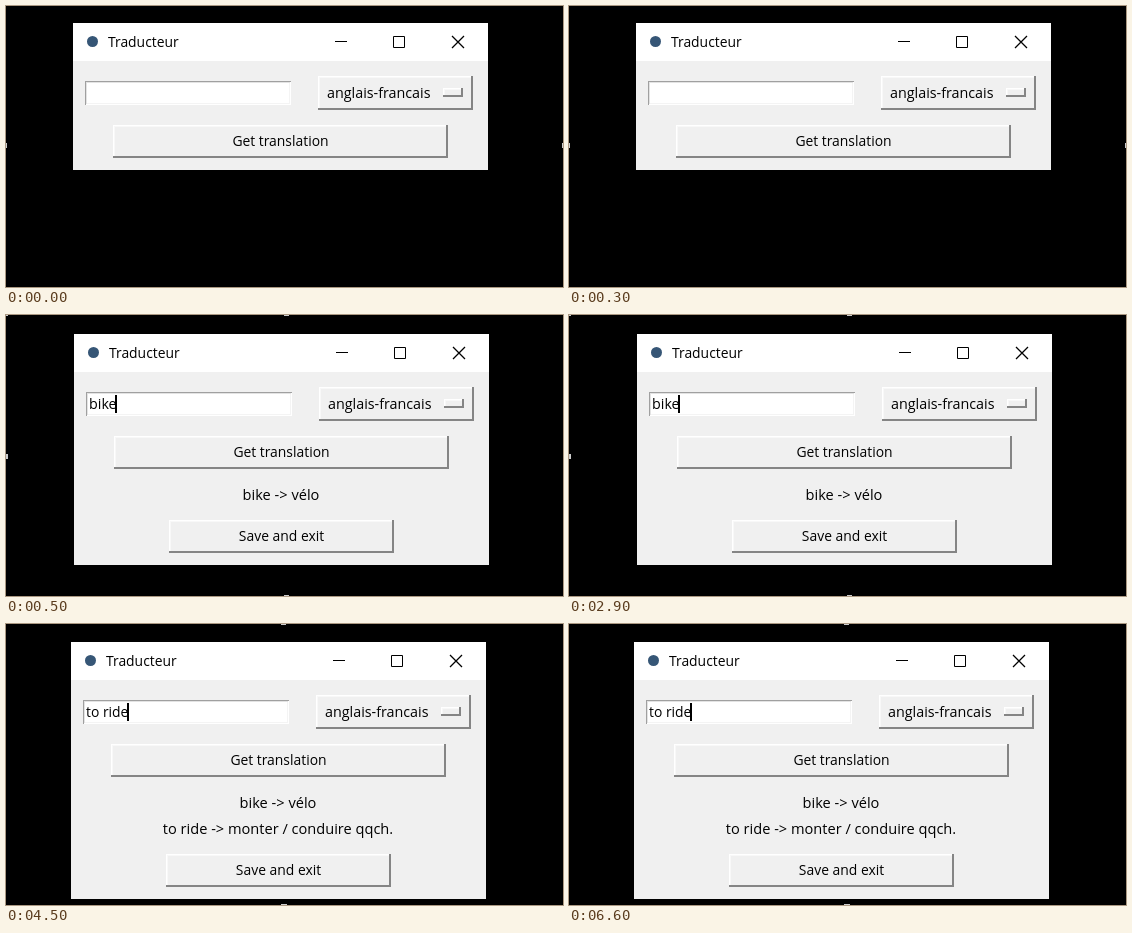
An HTML page that plays this animation: 557 px wide and 281 px high, repeating every 8 s.

```html
<!DOCTYPE html>
<html lang="fr">
<head>
<meta charset="utf-8">
<title>Traducteur</title>
<style>
  html, body { margin: 0; width: 100%; height: 100%; overflow: hidden; background: #000; }
  #stage { position: relative; width: 557px; height: 281px; overflow: hidden; background: #000; }
  #stage div, #stage svg { position: absolute; white-space: pre; }

  .window {
    left: 67px; top: 17px; width: 415px; height: 147px;
    background: #f0f0f0; color: #000;
    font: 14.3px "Open Sans", "Noto Sans", sans-serif;
    animation: window 8s step-end infinite;
  }
  .bar { left: 0; top: 0; width: 415px; height: 38px; background: #fff; }
  .icon { left: 14px; top: 13px; width: 11px; height: 11px; border-radius: 50%; background: #365676; }
  .title { left: 35px; top: 0; font-size: 13.9px; line-height: 38px; }
  .controls { left: 255px; top: 8px; fill: none; stroke: #000; }

  .entry {
    left: 12px; top: 58px; width: 206px; height: 24px; background: #fff;
    box-shadow: inset 1px 1px #a0a0a0, inset -1px -1px #fff,
                inset 2px 2px #e3e3e3, inset -2px -2px #f4f4f4;
  }
  .layer { left: 0; top: 0; }
  .typed { left: 3px; top: 0; line-height: 24px; }
  .caret { top: 3px; width: 2px; height: 18px; background: #000; }

  .raised {
    background: #f0f0f0;
    box-shadow: inset -2px -2px #858585, inset 1px 1px #fff, inset 2px 2px #f8f8f8;
  }
  .menu { left: 245px; top: 53px; width: 155px; height: 34px; }
  .menu span { position: absolute; left: 9px; line-height: 34px; }
  .indicator { left: 125px; top: 12px; width: 20px; height: 9px; }
  .button { height: 33px; line-height: 32px; text-align: center; font-size: 13.9px; }
  .get { left: 40px; top: 102px; width: 335px; }
  .save { left: 95px; top: 186px; width: 225px; animation: save 8s step-end infinite; }
  .label { left: 0; width: 414px; line-height: 20px; text-align: center; font-size: 14.6px; }

  .mark { background: #ccc; }
  .first { animation: first 8s step-end infinite; }
  .second { animation: second 8s step-end infinite; }
  .third { animation: third 8s step-end infinite; }
  .result { animation: result 8s step-end infinite; }

  @keyframes window {
    0% { left: 67px; top: 17px; height: 147px; }
    6.25% { left: 68px; top: 19px; height: 231px; }
    56.25%, 100% { left: 65px; top: 18px; height: 257px; }
  }
  @keyframes save {
    0% { top: 186px; visibility: hidden; }
    6.25% { top: 186px; visibility: visible; }
    56.25%, 100% { top: 212px; visibility: visible; }
  }
  @keyframes first {
    0% { visibility: visible; }
    6.25%, 100% { visibility: hidden; }
  }
  @keyframes second {
    0% { visibility: hidden; }
    6.25% { visibility: visible; }
    56.25%, 100% { visibility: hidden; }
  }
  @keyframes third {
    0% { visibility: hidden; }
    56.25%, 100% { visibility: visible; }
  }
  @keyframes result {
    0% { visibility: hidden; }
    6.25%, 100% { visibility: visible; }
  }
</style>
</head>
<body>
<div id="stage">
  <!-- selection handles at the stage edges -->
  <div class="layer first">
    <div class="mark" style="left:0;top:137px;width:1px;height:5px"></div>
    <div class="mark" style="left:556px;top:137px;width:1px;height:5px"></div>
  </div>
  <div class="layer second">
    <div class="mark" style="left:0;top:0;width:2px;height:1px"></div>
    <div class="mark" style="left:278px;top:0;width:5px;height:1px"></div>
    <div class="mark" style="left:0;top:139px;width:2px;height:5px"></div>
    <div class="mark" style="left:278px;top:280px;width:5px;height:1px"></div>
  </div>
  <div class="layer third">
    <div class="mark" style="left:275px;top:0;width:5px;height:1px"></div>
    <div class="mark" style="left:275px;top:280px;width:6px;height:1px"></div>
  </div>

  <div class="window">
    <div class="bar">
      <div class="icon"></div>
      <div class="title">Traducteur</div>
      <svg class="controls" width="150" height="22">
        <path d="M7 10.5h12M65.5 5.5h11v11h-11z"/>
        <path d="M124 5l12 12M136 5l-12 12" stroke-width="1.3"/>
      </svg>
    </div>

    <div class="entry">
      <div class="layer second">
        <div class="typed">bike</div>
        <div class="caret" style="left:29px"></div>
      </div>
      <div class="layer third">
        <div class="typed" style="font-size:13.9px">to ride</div>
        <div class="caret" style="left:44px"></div>
      </div>
    </div>

    <div class="menu raised"><span>anglais-francais</span><div class="indicator raised"></div></div>
    <div class="button get raised">Get translation</div>
    <div class="label result" style="top:150px">bike -&gt; vélo</div>
    <div class="label third" style="top:176px">to ride -&gt; monter / conduire qqch.</div>
    <div class="button save raised">Save and exit</div>
  </div>
</div>
</body>
</html>
```
